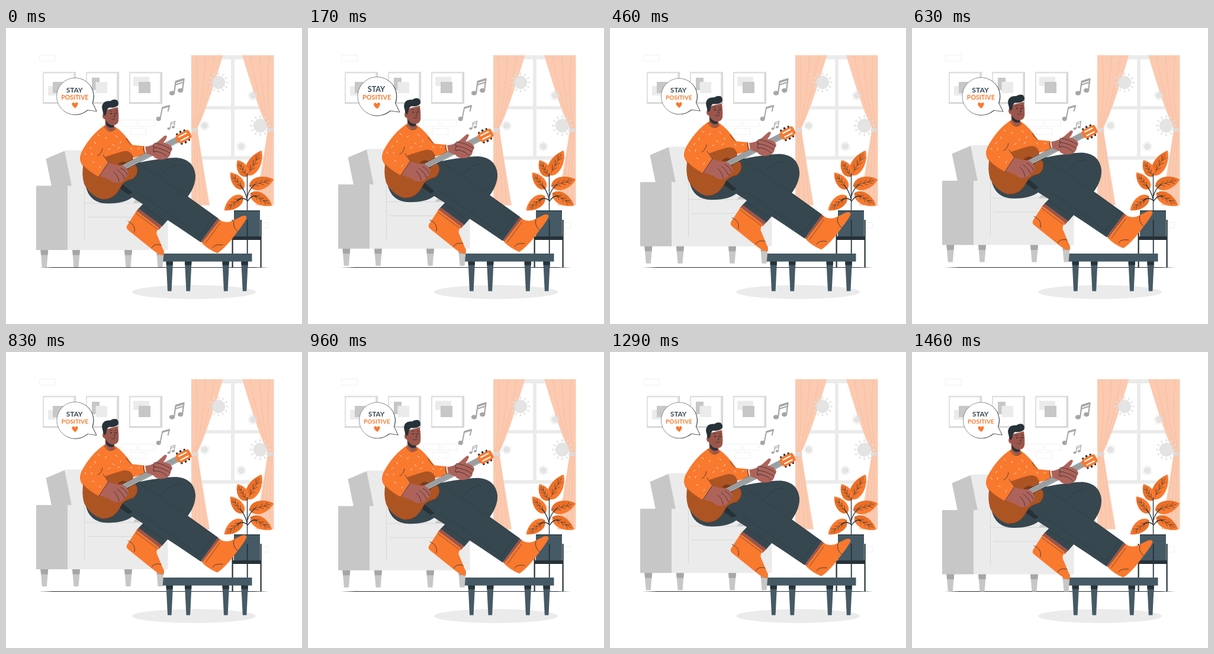
An HTML page that plays this animation: 500x500 px, repeating every 1.5 s.

```html
<!DOCTYPE html>
<html lang="en">
<head>
<meta charset="utf-8">
<title>Stay positive</title>
<style>
  html, body { margin: 0; width: 100%; height: 100%; overflow: hidden; background: #fff }
  svg { display: block; width: 100%; height: 100% }
  .line { fill: none; stroke: #263238; stroke-width: .8; stroke-linecap: round; stroke-linejoin: round }
  .dark { fill: #263238 } .slate { fill: #455a64 } .pants { fill: #37474f }
  .orange { fill: #f9792e } .pale { fill: #ebebeb } .grey { fill: #c7c7c7 }
  .skin { fill: #ae635a } .face { fill: #9c554a } .note { fill: none; stroke: #a6a6a6 }
  text { font: 700 11.6px Lato, sans-serif; text-anchor: middle }
</style>
</head>
<body>
<svg viewBox="0 0 500 500">
  <defs>
    <g id="frame">
      <path fill="#d6d6d6" d="M0 0H56V54H0Z"/>
      <path fill="#e0e0e0" d="M0 0H54V52H0Z"/>
      <path fill="#fff" d="M2 2.500H52V51H2Z"/>
    </g>
    <g id="curtain">
      <path fill="#fbcab0" d="M313 46H366.500C355 84 338 140 323.500 169L324 176Q332 228 344 299.500H313Z"/>
      <path fill="none" stroke="#f5b595" stroke-width=".6" d="M321 46Q327 120 316 169M337 46Q334 120 319 169M353 46Q341 115 321 169M316 176Q322 235 319 299M319 176Q326 235 328 299M322 176Q331 235 336 299"/>
      <path fill="#e3d8d3" d="M313 169H323.500Q326 172 324.500 175.500H313Z"/>
    </g>
    <g id="tableLeg">
      <path class="slate" d="M-5.500 394H6L3.600 444.500H-3Z"/>
      <path class="dark" d="M-5.500 394H6L5.600 400.500H-5.200Z"/>
    </g>
    <g id="sofaLeg">
      <path class="grey" d="M-6.500 375H6.500L4 404.500H-4Z"/>
      <path fill="#a6a6a6" d="M-6.500 375H6.500L5.700 384H-5.700Z"/>
    </g>
    <path id="balloon" d="M145.200 126L152 140L137 138A30.300 30.300 0 1 1 145.200 126Z"/>
  </defs>

  <!-- Wall -->
  <path fill="none" stroke="#ececec" stroke-width=".8" d="M56.500 45.500H83V56H56.500ZM195 155.500H221.500V166H195ZM225 155.500H251.500V166H225ZM210 169.500H236.500V180H210ZM431 328.500H443.500V338H431"/>
  <use href="#frame" x="62" y="74"/>
  <use href="#frame" x="135" y="74"/>
  <use href="#frame" x="208" y="74"/>
  <path class="pale" d="M71 98H94V114H71ZM215 82.500H242V98H215Z"/>
  <path class="grey" d="M79 91H98V110H79ZM145 84H158V105H145ZM224 91H244V110H224Z"/>
  <path class="pale" d="M151.500 91H171V110H151.500Z"/>

  <!-- Window -->
  <path class="pale" d="M330 46H436V53H330ZM380 46H386V222H380ZM326 132H440V137.500H326ZM322 216.500H442V222.500H322Z"/>
  <use href="#curtain"/>
  <use href="#curtain" transform="matrix(-1 0 0 1 765.500 0)"/>
  <g id="viruses" fill="#e4e4e4" stroke="#e0e0e0"></g>

  <!-- Notes -->
  <g class="note" stroke-width="2.200">
    <path d="M284 110L286.500 91L300.500 86.500L298 105M286 96L300 91.500"/>
    <path d="M286.500 91L300.500 86.500" stroke-width="3.500"/>
    <path d="M260.500 153L264 135L276 131.500L273.500 141" stroke-width="2"/>
    <path d="M264 135L276 131.500" stroke-width="3"/>
    <path d="M277 170L278.500 160L285.500 157.500L284 167M278 163L285 160.500" stroke-width="1.300"/>
  </g>
  <g fill="#a6a6a6">
    <ellipse cx="280.500" cy="110" rx="4.600" ry="3.800"/>
    <ellipse cx="294.700" cy="105.500" rx="4.600" ry="3.800"/>
    <ellipse cx="257.700" cy="153.500" rx="4" ry="3.700"/>
    <ellipse cx="275" cy="170" rx="2.600" ry="2"/>
    <ellipse cx="282.300" cy="167.500" rx="2.600" ry="2"/>
  </g>

  <!-- Floor, plant and table -->
  <path class="dark" d="M55 404.500L80 404H420L445 404.500L420 405H80Z"/>
  <ellipse class="pale" cx="317.500" cy="446" rx="104.500" ry="11.700"/>
  <g id="leaves"></g>
  <path class="line" style="stroke-width:1.300" d="M407.500 309V246M407.500 290Q404 275 396 266M408 284Q410 273 420 265M408 292Q400 284 390 292M408 293Q415 281 424 285"/>
  <path class="slate" d="M385 308H429V353H385Z"/>
  <path fill="#37474f" d="M385 308H429V310H385Z"/>
  <path class="dark" d="M382 352H431.500V358H382ZM381.500 324H383.700V404.500H381.500ZM429.500 324H431.700V404.500H429.500ZM406.800 324H408.600V404.500H406.800Z"/>
  <use href="#tableLeg" x="276"/>
  <use href="#tableLeg" x="307.500"/>
  <use href="#tableLeg" x="371"/>
  <use href="#tableLeg" x="402.800"/>
  <path class="slate" d="M263.500 381H415.500V394.500H263.500Z"/>

  <g id="floating">
    <!-- Sofa -->
    <use href="#sofaLeg" x="64.800"/>
    <use href="#sofaLeg" x="118.500"/>
    <use href="#sofaLeg" x="206.500"/>
    <use href="#sofaLeg" x="260.500"/>
    <path class="pale" d="M98 208.500Q100 207 104 207H200L215 300H104Z"/>
    <path class="grey" d="M67.500 221.500L99 208L111 268H77Z"/>
    <path class="pale" d="M103 267H132V290H273.500V375.500H103Z"/>
    <path class="grey" d="M51 267H104V375.500H51ZM214 296L228 282V296Z"/>
    <path fill="none" stroke="#d2d2d2" stroke-width=".8" d="M132.500 267V360M132.500 296.500H240M138 320H228"/>

    <!-- Back leg -->
    <path class="pants" d="M134 265Q140 297 172 297Q202 297 215 285L243 286L222.500 307L263.500 336L301 293Q321 270 320 249Q317 222 288 219.500Q260 220 215 230Z"/>
    <path class="line" d="M237 292L230 301L266 325M264 247Q281 231 292 232" opacity=".7"/>
    <path class="face" d="M224 305.500L264 335L258 341.500L219 311Z"/>
    <path class="orange" d="M220.500 309.500L259 338.500Q251.500 345 256 352L266 376Q268.500 384.500 264 384.500Q258 383 250 377L207 342.500Q202 339 204.500 334Z"/>
    <path class="line" d="M206 327Q220 333 217 346M246 372Q250 364 262 367"/>
    <path class="line" stroke-dasharray="1.500 1.500" d="M220 314L255 340"/>

    <!-- Front leg -->
    <path class="pants" d="M186 270L214 231L226 227L358.500 322L329 362.500Q260 315 186 270Z"/>
    <path class="dark" d="M190 270L197 264L214 279L207 282Z"/>
    <path class="line" d="M223 279Q278 315 327 352L351 319M228 232Q284 268 352 319" opacity=".5"/>
    <path class="face" d="M358 322L329.500 362L335 365L363 326Z"/>
    <path class="orange" d="M361 325Q373 332 385 325L398 318.500Q406 316 406.500 321Q405 327 390 346Q371 372 357 381Q342 375 331 364Z"/>
    <path class="line" d="M349 372Q352 365 366 367M385 326Q382 336 391 344"/>
    <path class="line" stroke-dasharray="1.500 1.500" d="M361 331L337 364"/>

    <!-- Sweater and head -->
    <path class="orange" d="M168 164Q177 173 184 167Q198 176 213 198L233 200L236 214L214 220L196 238L155 240L130 234Q122 224 127 211Q143 180 168 164Z"/>
    <path class="face" d="M167 150L168 167Q176 179 184 170L182 160Z"/>
    <path class="dark" d="M169 156Q172 165 182 165L182 168Q173 171 169 163Z"/>
    <path class="face" d="M165 140L189 134Q191 150 190 158Q188 165 181 164.500Q171 163 168 155Q163 154 163 149Z"/>
    <path class="dark" d="M163.500 141Q161 134 163 130Q166 123 176 124Q181 120 187 122Q191 125 189.500 131Q185 136 174 135Q170 137 169.500 145L167 149Q164 147 163.500 141Z"/>
    <path class="line" d="M175 141Q177 139 179 141M184 140.500Q186 139 188 140.500M182.500 144L184.500 150L181.500 150.500M178 154Q182 157 185 153"/>
    <circle class="dark" cx="177.500" cy="145" r="1.200"/>
    <circle class="dark" cx="186" cy="144.500" r="1.200"/>
    <path class="line" d="M166 167Q174 181 185 171M212 198Q206 193 203 187M233 200Q231 207 235 213"/>

    <!-- Guitar -->
    <path fill="#ad5423" d="M131 229Q152 228 166 219Q185 212 199 208.500Q211 207 214 217Q213 228 221 235Q225 246 215 255Q199 259 195 267Q184 291 163 290Q143 285 132 264Q127 247 131 229Z"/>
    <path fill="none" stroke="#7f3a18" stroke-width=".8" d="M214 217Q213 228 221 235Q225 246 215 255Q199 259 195 267Q184 291 163 290"/>
    <ellipse cx="198" cy="235" rx="10" ry="9" fill="#7f3a18"/>
    <g transform="translate(196 238) rotate(-27.300)">
      <path fill="#c7c7c7" d="M-8 -5H105V4H-8Z"/>
      <path class="line" style="stroke-width:.6" d="M-8 -5H105M-8 -2.800H108M-8 -.6H108M-8 1.600H108M-8 4H105"/>
      <path class="line" style="stroke-width:3.500" d="M109 -9V-8M116 -10V-9M123 -9V-8M109 8V9M116 9V10M123 8V9"/>
      <path class="orange" d="M104 -5L108 -8Q122 -9 129 -7Q131 0 129 7Q121 9 108 8L104 4Z"/>
      <path fill="none" stroke="#fff" stroke-width="2.200" stroke-linecap="round" d="M110 -3.500H124M110 3.500H124"/>
    </g>

    <!-- Strumming arm -->
    <path class="skin" d="M171 226Q181 233 195 232Q207 237 207 246Q207 251 201 254Q198 262 188 262Q181 263 175 257L157 250Z"/>
    <path class="line" d="M194 237Q203 242 205 249M188 240Q197 247 200 255M182 244Q190 251 191 260"/>
    <path class="orange" d="M170 185L164 213L173 227L157 252Q128 236 125 222Q125 213 136 199L155 180Z"/>
    <path class="line" d="M163 204Q161 214 155 216M164 215L173 227.500L157 251.500"/>

    <!-- Fretting arm -->
    <path class="skin" d="M235 201Q247 200 257 192L266 184Q270 180 272 184Q270 190 266 194Q279 197 281 204Q280 208 278 211Q278 219 268 222Q255 225 249 217L237 212Z"/>
    <path class="line" d="M251 195Q266 197 279 206M249 202Q263 203 277 212M249 209Q262 208 272 218M251 195Q247 199 251 203Q246 207 251 211"/>

    <path fill="none" stroke="#ffe0c8" stroke-width="1" stroke-linecap="round" d="M155 181l3 2M150 193l1 3M141 204l3 -2M167 187l3 -2M185 182l3 3M194 192l-1 3M180 197l3 2M146 226l3 2M189 204l3 -2M133 212l2 3M158 237l2 -3M144 215l1 -3M173 206l3 -2M210 203l3 2M223 205l3 -2"/>
  </g>

  <g id="bubble">
    <use href="#balloon" class="dark" x=".8" y=".4"/>
    <use href="#balloon" fill="#fff" stroke="#263238" stroke-width=".5"/>
    <text x="115.700" y="109" fill="#37474f">STAY</text>
    <text x="116.400" y="121" fill="#f9792e" style="font-size:10.100px">POSITIVE</text>
    <path class="orange" d="M117 135Q111 130.500 111.500 127.500Q113 123.500 116.500 127Q120 123.500 121.500 127Q121.500 131 117 135Z"/>
  </g>
</svg>
<script>
const byId = id => document.getElementById(id);

function virus(x, y, r) {
  let spikes = "", knobs = "";
  for (let i = 0; i < 12; i++) {
    const a = i * Math.PI / 6, kx = x + Math.cos(a) * r * 1.45, ky = y + Math.sin(a) * r * 1.45;
    spikes += `M${x} ${y}L${kx} ${ky}`;
    knobs += `<circle cx="${kx}" cy="${ky}" r="${r * .1}"/>`;
  }
  return `<path d="${spikes}" stroke-width="${r * .08}"/><circle cx="${x}" cy="${y}" r="${r}"/>${knobs}`;
}

// A leaf from its base to its tip, w is half its width.
function leaf(x, y, tipX, tipY, w) {
  const dx = tipX - x, dy = tipY - y, len = Math.hypot(dx, dy);
  const at = (u, v) => `${x + dx * u - dy / len * v} ${y + dy * u + dx / len * v}`;
  const half = (v, fill) =>
    `<path fill="${fill}" d="M${at(0, 0)}C${at(.1, v)} ${at(.65, v)} ${at(1, 0)}Z"/>`;
  let veins = `M${at(0, 0)}L${at(.85, 0)}`;
  for (const u of [.2, .4, .6])
    veins += `M${at(u + .16, w * .4)}L${at(u, 0)}L${at(u + .16, -w * .4)}`;
  return half(w * 1.33, "#f9792e") + half(-w * 1.33, "#ec6f26") +
    `<path class="line" style="stroke-width:.6" d="${veins}"/>`;
}

byId("viruses").innerHTML = [[359, 92, 10.5], [417, 114, 5], [335.5, 165, 5], [429.5, 165, 11], [397.5, 200, 5]]
  .map(v => virus(...v)).join("");
byId("leaves").innerHTML = [
  [408, 249, 432, 207, 11], [407, 251, 391, 223, 9], [401, 272, 379, 244, 9],
  [411, 267, 452.5, 256, 11], [400, 284, 368.5, 308, 10], [413, 279, 449.5, 300, 10]
].map(l => leaf(...l)).join("");

function draw() {
  const p = (performance.now() + 40) % 1500 / 1500;
  const lift = 10 * (1 - Math.abs(2 * p - 1));
  const beat = Math.max(0, Math.min(p / .1, (.3 - p) / .2), Math.min(p - .4, .6 - p) / .1);
  byId("floating").setAttribute("transform", `translate(0 ${-lift})`);
  byId("bubble").setAttribute("transform", `translate(118.5 115.5) scale(${1 + .1 * beat}) translate(-118.5 -115.5)`);
  requestAnimationFrame(draw);
}
draw();
</script>
</body>
</html>
```
